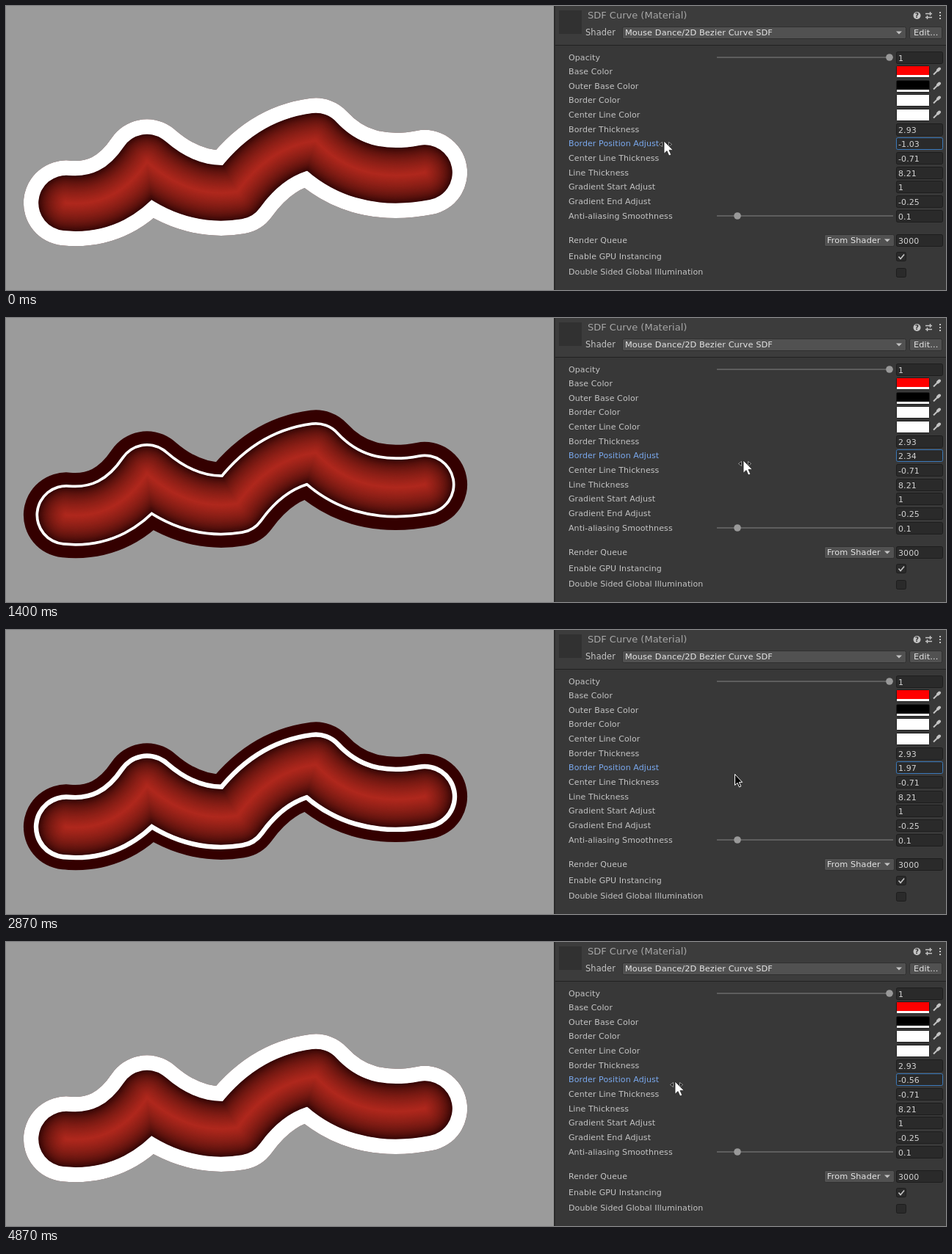
An HTML page for the animation above (4940 ms loop, 1280 px wide and 387 px high).

```html
<!DOCTYPE html>
<html lang="en">
<head>
<meta charset="utf-8">
<title>SDF Curve</title>
<style>
html, body { margin: 0; width: 100%; height: 100%; overflow: hidden; background: #9b9b9b; }
svg { display: block; }
text { font: 11px "DejaVu Sans", Verdana, sans-serif; letter-spacing: .1px; fill: #c4c4c4; white-space: pre; }
.worm { fill: none; stroke-linecap: round; stroke-linejoin: round; }
.field { fill: #2a2a2a; stroke: #1d1d1d; }
.button { fill: #515151; stroke: #303030; }
.bright { font-size: 11.3px; fill: #e4e4e4; }
.value { fill: #d2d2d2; }
.icon { fill: none; stroke: #c4c4c4; }
</style>
</head>
<body>
<svg id="stage" width="1280" height="387" viewBox="0 0 1280 387"></svg>
<script>
const DURATION = 4940, STEP = 200 / 3;
const UNIT = 7.08, LINE = 8.21, BORDER = 2.93, INNER = (LINE - BORDER) * UNIT + .4;
const ROW = 19.64;
const CURVE = 'M82 268.5Q150 275 192 212.5Q250.5 263.5 315 253Q359 191.5 422 183.5Q478 244.5 570 227';

// turns of the drag: time, border position, cursor y
const DRAG = [
  [0, -1.03, 184], [267, -1.4, 184], [667, -.67, 184], [1400, 2.34, 194],
  [1533, 2.6, 197], [1667, 2.6, 197], [2000, .81, 199], [2400, -.45, 197],
  [2867, 1.97, 195.5], [3133, 2.36, 195.5], [3800, 2.36, 195.5],
  [4533, -.56, 190], [DURATION, -.56, 190]
];

const rect = (x, y, w, h, attrs) => `<rect x="${x}" y="${y}" width="${w}" height="${h}" ${attrs}/>`;
const text = (x, y, s, attrs = '') => `<text x="${x}" y="${y}" ${attrs}>${s}</text>`;
const path = (d, attrs) => `<path d="${d}" ${attrs}/>`;
const worm = (r, color, id = '') => path(CURVE, `class="worm" id="${id}" stroke="${color}" stroke-width="${2 * r}"`);
const box = (x, y, w, h, attrs) => rect(x + .5, y + .5, w, h, `rx="2" ${attrs}`);

const field = (y, value, id = '') =>
  box(1212, y - 8, 63, 16, `class="field" ${id && 'style="stroke:#3a79bb"'}`) +
  text(1215, y + 5, value, `class="value" id="${id}"`);
const slider = (x, y) =>
  rect(968, y - 1, 240, 2, 'fill="#5e5e5e"') + `<circle cx="${x}" cy="${y}" r="4.8" fill="#999"/>`;
const button = (x, y, w, label, pad) =>
  box(x, y, w, 16, 'class="button"') + text(x + pad, y + 12, label, 'class="bright"');
const popup = (x, y, w, label) =>
  button(x, y, w, label, 4) + path(`M${x + w - 13} ${y + 6.5}h8l-4 4z`, 'fill="#c4c4c4"');
const swatch = (y, color) =>
  box(1212, y - 8, 45, 16, 'class="field"') +
  rect(1213, y - 7, 44, 12, `fill="${color}"`) + rect(1213, y + 5, 44, 3, 'fill="#fff"') +
  path(`M1263 ${y + 4.5}l5.5-5.5`, 'class="icon" stroke-width="2"') +
  path(`M1269 ${y - 1.5}l2-2`, 'class="icon" stroke-width="4" stroke-linecap="round"');
const check = y => box(1212, y, 13, 12, 'class="field"');

// nested strokes form a distance field, blended in linear light
function body() {
  const edge = [52, 2, 2], core = [176, 40, 29];
  const blend = k => edge.map((e, i) => Math.round(Math.sqrt(e * e * (1 - k) + core[i] ** 2 * k)));
  let out = '';
  for (let r = INNER; r > 0; r -= .6) out += worm(r, `rgb(${blend(1 - r / INNER)})`);
  return out;
}

function panel() {
  const rows = [
    ['Opacity', y => slider(1203, y) + field(y, '1')],
    ['Base Color', y => swatch(y, '#f00')],
    ['Outer Base Color', y => swatch(y, '#000')],
    ['Border Color', y => swatch(y, '#fff')],
    ['Center Line Color', y => swatch(y, '#fff')],
    ['Border Thickness', y => field(y, BORDER)],
    ['Border Position Adjust', y => field(y, '', 'value')],
    ['Center Line Thickness', y => field(y, '-0.71')],
    ['Line Thickness', y => field(y, LINE)],
    ['Gradient Start Adjust', y => field(y, '1')],
    ['Gradient End Adjust', y => field(y, '-0.25')],
    ['Anti-aliasing Smoothness', y => slider(996, y) + field(y, '0.1')]
  ];
  return rect(746, 0, 534, 387, 'fill="#383838"') + rect(746, 0, 534, 53, 'fill="#3c3c3c"') +
    rect(746, 53, 534, 1, 'fill="#212121"') + rect(746, 0, 2, 387, 'fill="#2b2b2b"') +
    rect(753, 6, 31, 32, 'fill="#313131"') +
    text(792, 17, 'SDF Curve (Material)', 'style="font-size:13px;letter-spacing:0;fill:#a6a6a6"') +
    '<circle cx="1240.5" cy="13" r="5" fill="#c4c4c4"/>' +
    text(1240.5, 16.4, '?', 'text-anchor="middle" style="font-size:9px;font-weight:bold;fill:#333"') +
    path('M1252 10.5h9M1252 15.5h9M1258.5 8v5M1254.5 13v5', 'class="icon" stroke-width="1.4"') +
    path('M1272 8v11', 'class="icon" stroke-width="2" stroke-dasharray="2"') +
    text(789, 40, 'Shader', 'style="font-size:11.4px"') +
    popup(839, 28, 386, 'Mouse Dance/2D Bezier Curve SDF') + button(1230, 28, 44, 'Edit...', 6) +
    rows.map(([label, control], i) => {
      const y = Math.floor(70 + i * ROW);
      return text(766, y + 4, label, label == 'Border Position Adjust' ? 'style="fill:#7baaf0"' : '') + control(y);
    }).join('') +
    text(766, 323, 'Render Queue') + popup(1114, 311, 95, 'From Shader') + field(319, '3000') +
    text(766, 345, 'Enable GPU Instancing') + check(335) +
    path('M1215.5 341.5l2.6 3 5-6', 'class="icon" stroke-width="1.6"') +
    text(766, 366, 'Double Sided Global Illumination') + check(357);
}

const cursor = `<g id="cursor">
  <g id="drag">
    <path d="M-6.5 4.5l4-3v6zM10.5 4.5l-4-3v6z" fill="#111" stroke="#fff" stroke-width=".5"/>
    <path d="M0 0V17.3L4 13.6 6.8 20 9.8 18.7 7 12.4H12.3Z" fill="#fff" stroke="#222" stroke-width=".8"/>
  </g>
  <path id="plain" d="M.5 .5V15.5L4 12.3 6.5 18 8.8 17 6.3 11.4H10.6Z" fill="#000" stroke="#fff"/>
</g>`;

const $ = id => document.getElementById(id);
$('stage').innerHTML = rect(0, 0, 746, 387, 'fill="#9b9b9b"') +
  worm(LINE * UNIT, '#340000') + worm(0, '#fff', 'border') + body() + panel() + cursor;

function pose(t) {
  const i = DRAG.findIndex(p => p[0] > t), a = DRAG[i - 1], b = DRAG[i];
  const k = (t - a[0]) / (b[0] - a[0]);
  return [1, 2].map(n => a[n] + (b[n] - a[n]) * k);
}

function draw(now) {
  const t = Math.floor((now % DURATION + 5) / STEP) * STEP;
  const [position, y] = pose(t);
  const x = 929 + 32 * position;
  const idle = t > 2790 && t < 3860;
  $('border').setAttribute('stroke-width', 2 * UNIT * (LINE - Math.max(0, position)));
  $('value').textContent = +position.toFixed(2);
  $('cursor').setAttribute('transform', `translate(${Math.round(x)} ${Math.round(y)})`);
  $('drag').style.display = idle ? 'none' : '';
  $('plain').style.display = idle ? '' : 'none';
  requestAnimationFrame(draw);
}
requestAnimationFrame(draw);
</script>
</body>
</html>
```
